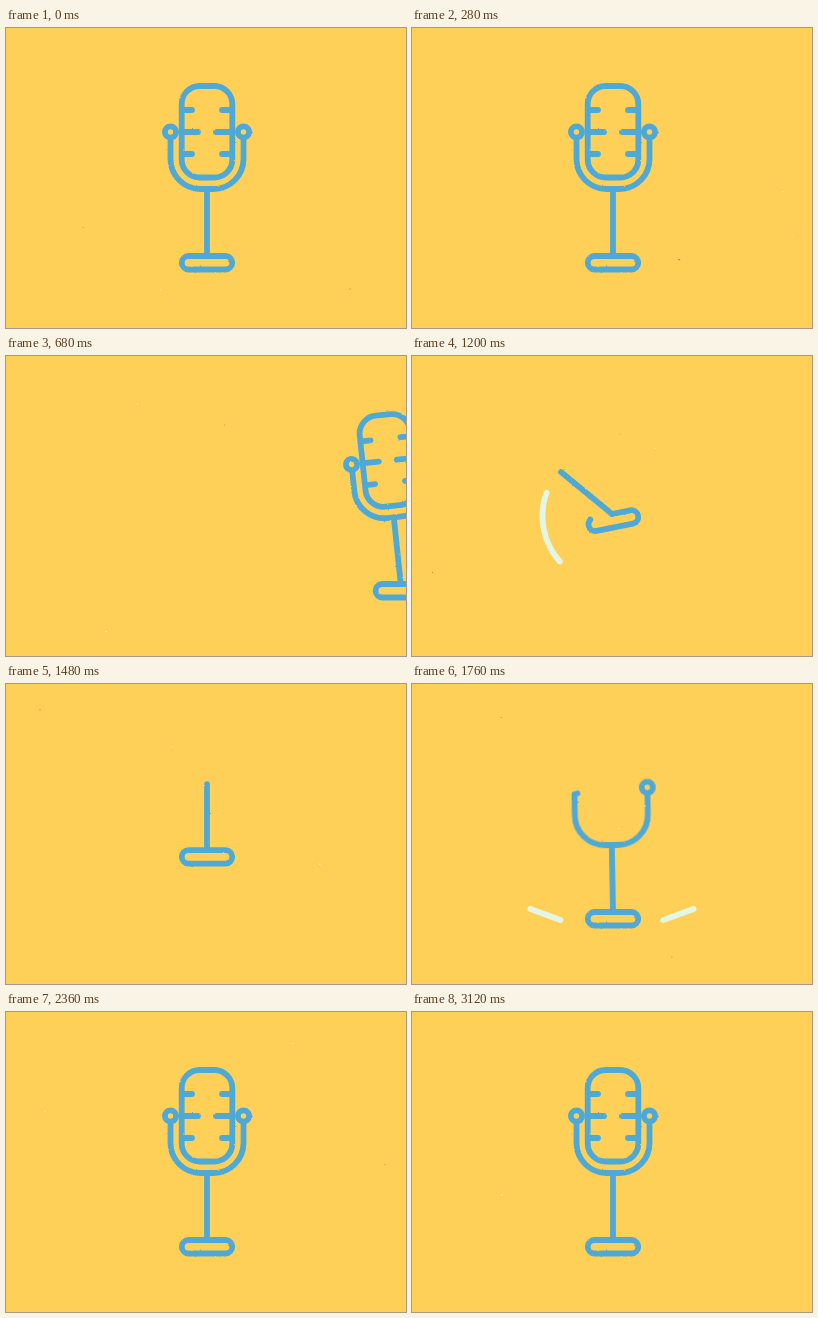
Write an HTML page that moves like this. It is 400 px wide and 300 px high and loops after 3160 ms.

```html
<!DOCTYPE html>
<html lang="en">
<head>
<meta charset="utf-8">
<title>Microphone loop</title>
<style>
  html, body { margin: 0; width: 100%; height: 100%; overflow: hidden; background: #ffd057; }
  svg { display: block; width: 100vw; height: 100vh; }
  path { fill: none; stroke-width: 5.8; stroke-linecap: round; stroke-linejoin: round; }
  #mic path { stroke: #4fa9d6; }
  #accents path { stroke: #e4f6e6; }
</style>
</head>
<body>
<svg viewBox="0 0 400 300">
  <filter id="rough" filterUnits="userSpaceOnUse" x="0" y="0" width="400" height="300" color-interpolation-filters="sRGB">
    <feTurbulence type="fractalNoise" baseFrequency="0.25" numOctaves="2" seed="4"/>
    <feDisplacementMap in="SourceGraphic" scale="1.8" xChannelSelector="R" yChannelSelector="G"/>
  </filter>
  <g filter="url(#rough)">
    <g id="accents">
      <path id="trail"/>
      <path id="hitL"/>
      <path id="hitR"/>
    </g>
    <!-- the origin is where the stem meets the base -->
    <g id="mic">
      <path id="base" pathLength="1" d="M0 0H18.5a6.75 6.75 0 0 1 0 13.5H-18.5a6.75 6.75 0 0 1 0-13.5H0"/>
      <g id="top">
        <path id="stem" d="M0 0V-66"/>
        <path id="armL" pathLength="1"/>
        <path id="armR" pathLength="1" transform="scale(-1 1)"/>
        <path id="body" pathLength="1" d="M0-78.5H-7.3a18 18 0 0 1-18-18V-152a18 18 0 0 1 18-18H7.3a18 18 0 0 1 18 18V-96.5a18 18 0 0 1-18 18H0"/>
        <path id="bars"/>
      </g>
    </g>
  </g>
  <g id="dust"></g>
</svg>
<script>
const LOOP = 3160, STEP = 40;
const $ = id => document.getElementById(id);
const linear = p => p;
const easeIn = p => p * p;
const easeOut = p => 1 - (1 - p) * (1 - p);
const smooth = p => p * p * (3 - 2 * p);

// keys: [time, value, easing towards this key]
function at(t, keys) {
  if (t <= keys[0][0]) return keys[0][1];
  for (let i = 1; i < keys.length; i++) {
    const [t0, v0] = keys[i - 1], [t1, v1, ease = linear] = keys[i];
    if (t < t1) return v0 + (v1 - v0) * ease((t - t0) / (t1 - t0));
  }
  return keys[keys.length - 1][1];
}

const arm = 'M0-67H-6.5a30 30 0 0 1-30-30V-118.4a5.6 5.6 0 0 0 0-11.2a5.6 5.6 0 0 0 0 11.2';
$('armL').setAttribute('d', arm);
$('armR').setAttribute('d', arm);

const show = (el, on) => { el.style.display = on ? '' : 'none'; };

function trim(id, part) {
  const el = $(id);
  show(el, part > 0);
  el.setAttribute('stroke-dasharray', part >= 1 ? 'none' : `${part} 2`);
}

const exitLean = [[290, 0], [480, -1.2, easeIn], [680, -6], [760, -7.5]];
const height = [[880, 345], [1200, 158, easeOut], [1300, 154, easeOut], [1420, 160, easeIn], [1620, 228, easeIn]];
const spin = [[880, -260], [1040, -170], [1200, -50.6], [1360, 7, easeOut], [1460, 0, smooth],
  [1640, 0], [1700, 1.5, smooth], [1760, -1, smooth], [1840, 0.5, smooth], [1920, 0, smooth]];
const baseTilt = [[1040, -50], [1200, -11.5], [1340, 4, easeOut], [1440, 0, smooth]];
const trailHead = [[1040, -180], [1200, -70.2], [1300, -35, easeOut]];
const trailTail = [[1040, -180], [1200, -131.6, easeIn], [1300, -35]];
const hitHead = [[1620, -18], [1760, 32, easeOut], [1880, 44, easeOut]];
const hitTail = [[1620, -18], [1760, 0], [1880, 44]];

function drawMic(t) {
  const leaving = t < 800;
  const x = leaving ? 201 + 0.001274 * Math.max(0, t - 290) ** 2
                    : at(t, [[1200, 200], [1460, 201, smooth]]);
  const y = leaving ? 228 : at(t, height);
  $('mic').setAttribute('transform', `translate(${x} ${y})`);
  $('top').setAttribute('transform', `rotate(${at(t, leaving ? exitLean : spin)})`);
  $('base').setAttribute('transform', `rotate(${leaving ? 0 : at(t, baseTilt)})`);

  const part = keys => leaving ? 1 : at(t, keys);
  trim('base', part([[1040, 0], [1200, 0.805], [1280, 1, easeOut]]));
  trim('armL', part([[1600, 0], [1760, 0.715], [1840, 1, easeOut]]));
  trim('armR', part([[1580, 0], [1740, 1]]));
  trim('body', part([[1800, 0], [2160, 1, smooth]]));

  const grow = part([[2080, 0], [2280, 1, easeOut]]);
  show($('bars'), grow > 0);
  $('bars').setAttribute('d', [[-146, 9], [-124, 15], [-102, 9]].map(([by, len]) =>
    `M-24 ${by}h${len * grow}M24 ${by}h${-len * grow}`).join(''));
}

function drawAccents(t) {
  const point = deg => {
    const a = deg * Math.PI / 180;
    return `${199 + 68.5 * Math.sin(a)} ${160 - 68.5 * Math.cos(a)}`;
  };
  show($('trail'), t > 1040 && t < 1300);
  $('trail').setAttribute('d', `M${point(at(t, trailTail))}A68.5 68.5 0 0 1 ${point(at(t, trailHead))}`);

  const head = at(t, hitHead), tail = at(t, hitTail);
  for (const [id, side] of [['hitL', -1], ['hitR', 1]]) {
    const end = s => `${200 + side * (51.5 + s * 0.94)} ${236 - s * 0.345}`;
    show($(id), t > 1620 && t < 1880);
    $(id).setAttribute('d', `M${end(tail)}L${end(head)}`);
  }
}

function drawDust(step) {
  let seed = step * 7919 + 17;
  const rnd = () => (seed = (seed * 16807 + 11) % 2147483647) / 2147483647;
  for (let i = 0; i < 4; i++) rnd();
  let specks = '';
  for (let i = 0; i < 3; i++) {
    const fill = rnd() < 0.5 ? '#8a6a34' : '#fff3cf';
    specks += `<ellipse cx="${rnd() * 400}" cy="${rnd() * 300}" rx="${0.5 + rnd() * 0.6}" ry="${0.4 + rnd() * 0.4}" fill="${fill}" opacity="${0.4 + rnd() * 0.5}"/>`;
  }
  $('dust').innerHTML = specks;
}

let last = -1;
function frame() {
  const step = Math.floor(performance.now() % LOOP / STEP);
  if (step !== last) {
    last = step;
    drawMic(step * STEP);
    drawAccents(step * STEP);
    drawDust(step);
  }
  requestAnimationFrame(frame);
}
frame();
</script>
</body>
</html>
```
